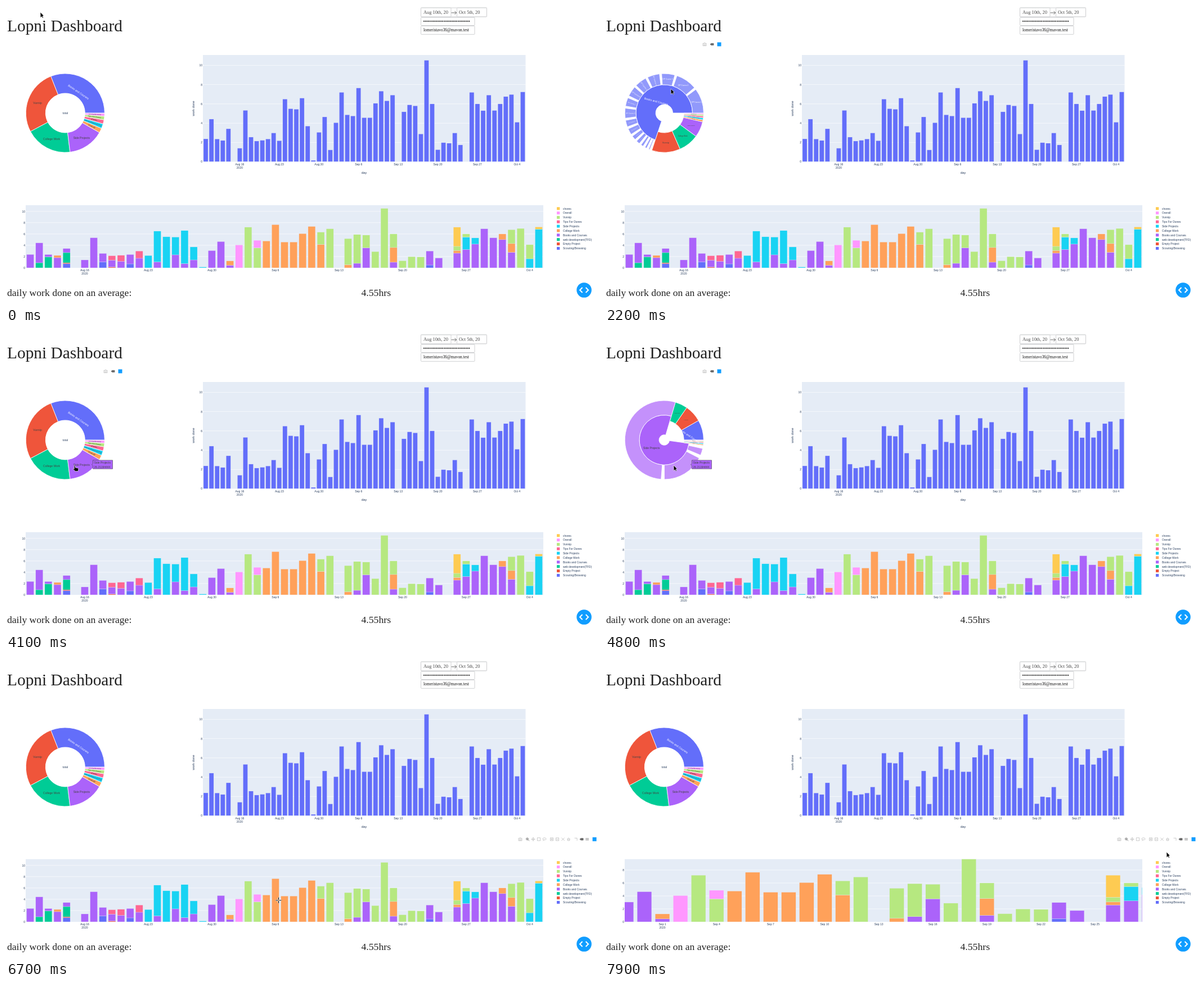
Animation, 1054 px wide and 531 px high, one loop 8 s. Source, as an HTML page:

```html
<!DOCTYPE html>
<html lang="en">
<head>
<meta charset="utf-8">
<title>Dashboard</title>
<style>
html, body { margin: 0; width: 100%; height: 100%; overflow: hidden; background: #fff; }
svg { display: block; width: 100%; height: 100%; font-family: "Liberation Sans", Arial, sans-serif; }
.serif { font-family: "Liberation Serif", "Times New Roman", serif; }
</style>
</head>
<body>
<svg id="stage" viewBox="0 0 1054 531"></svg>
<script>
const LOOP = 8000, ZOOM_AT = 7550, INK = '#2a3f5f', PANEL = '#e5ecf6';
const COLORS = { b: '#636efa', r: '#ef553b', g: '#00cc96', p: '#ab63fa', o: '#ffa15a',
  c: '#19d3f3', w: '#ff6692', l: '#b6e880', m: '#ff97ff', y: '#fecb52' };

// One entry per day from Aug 10; each part is a colour key and the height its top reaches.
const DAYS = (`p2.37|g.9 p4.42|g1.95 p2.36|p1.8 o2.2|b.75 r.9 g2.7 p3.42||p1.4|p5.33|b1.05 p2.55|
r.15 p1.35 w2.14|p1.15 w2.22|b.7 p2.36|p1.7 w2.98|c2.18|p1.05 c6.5|c5.5|p2.3 c5.45|p.75 c6.6|p1.4 c3.7|
c.14|p3.05|p4.65|p.45 o1.22|m4.05|l7.2|l3.55 m4.87|o4.75|o7.65|o4.57|o4.57|o6.06|o7.33|o4.15 l6.32|l6.92||
o.55 l5.18|p.8 l5.9|p3.55 l5.8|l2.88|l10.53|p1 o3.6 l6|l1.25|l1.98|l1.92|b.5 p2.98|p1.74||
p2.6 o3.08 l3.8 y7.2|p3.25 c5.45 l6|p4.2 c5.3|p6.92|p5.32|p5 o6|p2.75 o4.3 l6.76|l6.98|c1.6 l4.1|c6.85 y7.24`)
  .replace(/\n/g, '').split('|').map(day => day.split(' ').filter(Boolean)
    .map(part => ({ color: COLORS[part[0]], top: +part.slice(1) })));

const LEGEND = [['y', 'chores'], ['m', 'Overall'], ['l', 'Vunnip'], ['w', 'Tips For Dunes'],
  ['c', 'Side Projects'], ['o', 'College Work'], ['p', 'Books and Courses'],
  ['g', 'web development(TFD)'], ['r', 'Empty Project'], ['b', 'Scouting/Browsing']];

const text = (x, y, size, str, extra = '') =>
  `<text x="${x}" y="${y}" font-size="${size}" fill="${INK}" ${extra}>${str}</text>`;
const serif = (x, y, size, str, fill = '#222') =>
  `<text class="serif" x="${x}" y="${y}" font-size="${size}" fill="${fill}">${str}</text>`;
const rect = (x, y, w, h, fill, extra = '') =>
  `<rect x="${x}" y="${y}" width="${w}" height="${h}" fill="${fill}" ${extra}/>`;
const middle = 'text-anchor="middle"', end = 'text-anchor="end"';
const lerp = (a, b, t) => a + (b - a) * t;
const clamp = t => Math.max(0, Math.min(1, t));

const dateLabel = i => i < 22 ? `Aug ${10 + i}` : i < 52 ? `Sep ${i - 21}` : `Oct ${i - 51}`;

// c: plot box, first: x of day 0, step: px per day, unit: px per hour
function barChart(c) {
  const { left, right, top, base, first, step, unit, ticks, yMax, clip } = c;
  let out = `<clipPath id="${clip}">${rect(left, top, right - left, base - top, '#000')}</clipPath>`;
  out += rect(left, top, right - left, base - top, PANEL);
  for (let v = 0; v <= yMax; v += 2) {
    const y = base - v * unit;
    if (v) out += rect(left, y - .3, right - left, .6, '#fff');
    out += text(left - 1, y + 1.9, 5, v, end);
  }
  out += `<g clip-path="url(#${clip})" stroke="${PANEL}" stroke-width=".3">`;
  DAYS.forEach((parts, i) => {
    const x = first + (i - .4) * step;
    let from = 0;
    const shown = c.plain && parts.length ? [{ color: COLORS.b, top: parts[parts.length - 1].top }] : parts;
    for (const { color, top: to } of shown) {
      out += rect(x, base - to * unit, step * .8, (to - from) * unit, color);
      from = to;
    }
  });
  out += '</g>';
  ticks.forEach((i, n) => {
    const x = first + i * step;
    out += text(x, base + 6, 5, dateLabel(i), middle);
    if (!n) out += text(x, base + 12.3, 5, 2020, middle);
  });
  return out;
}
const series = (from, step, count) => Array.from({ length: count }, (_, n) => from + n * step);

const ICONS = {
  camera: 'M-3-1.6h1.6l.6-1h1.6l.6 1H3v4.2h-6zM0-.8a1.4 1.4 0 1 0 .01 0',
  glass: 'M-.5-2.5a2 2 0 1 0 .01 0M1 1l2 2M-1.5-.5h2M-.5-1.5v2',
  pan: 'M-3 0h6M0-3v6M-1-2l1-1 1 1M-1 2l1 1 1-1M-2-1l-1 1 1 1M2-1l1 1-1 1',
  box: 'M-2.6-2.6h5.2v5.2h-5.2z',
  lasso: 'M0-2.4c4 0 4 3.6 0 3.6s-4-3.6 0-3.6M-1.5 1l-.8 2',
  plus: 'M-2.5-2.5h5v5h-5zM-1.5 0h3M0-1.5v3',
  minus: 'M-2.5-2.5h5v5h-5zM-1.5 0h3',
  fit: 'M-2.7-2.7l5.4 5.4M2.7-2.7l-5.4 5.4',
  home: 'M-2.8 0l2.8-2.4 2.8 2.4M-1.8 0v2.4h3.6V0z',
  spike: 'M-2.5-2h4.5v4.5',
  tag: 'M-3 0l1.6-1.6H3v3.2h-4.4z',
  tags: 'M-2.6-1.8h5.2v1.3h-5.2zM-2.6.5h5.2v1.3h-5.2z'
};
const FULL = [['camera', -132], ['glass', -119, 1], ['pan', -109], ['box', -99], ['lasso', -89], ['plus', -76],
  ['minus', -66], ['fit', -56], ['home', -46], ['spike', -33], ['tag', -23, 1], ['tags', -13]];
function modebar(id, x, y, icons) {
  const marks = icons.map(([name, dx, dark]) => `<path d="${ICONS[name]}" transform="translate(${x + dx} ${y})"
    fill="${/tag/.test(name) ? '#444' : 'none'}" stroke="#444" stroke-width=".8" opacity="${dark ? .8 : .35}"/>`);
  return `<g id="${id}">${marks.join('')}${rect(x - 3.5, y - 3.5, 7, 7, '#119dff')}</g>`;
}

const field = (x, y, w, h) => rect(x, y, w, h, '#fff', 'stroke="#c4c6c8" stroke-width=".8" rx="1"');
function tooltip(id, x, y, w, fill, ink, lines) {
  return `<g id="${id}"><path d="M${x - 2} ${y}l2-2v-5.8h${w}v15.4h${-w}v-5.6z" fill="${fill}" stroke="${ink}" stroke-width=".6"/>
    ${lines.map((s, n) => `<text x="${x + 2}" y="${y - 1.3 + n * 7.3}" font-size="5" fill="${ink}">${s}</text>`).join('')}</g>`;
}

const daily = { left: 350, right: 923.5, top: 87, base: 276.5, first: 355.03, step: 10.061, unit: 17.1,
  ticks: series(6, 7, 8), yMax: 10, plain: true, clip: 'clipDaily' };
const stacked = { left: 35, right: 955, top: 353.7, base: 465, first: 43.07, step: 16.14, unit: 10.02,
  ticks: series(6, 7, 8), yMax: 10, clip: 'clipAll' };
const zoomed = { ...stacked, first: 38 - 20 * 32.04, step: 32.04, unit: 11.5,
  ticks: series(22, 3, 9), yMax: 8, clip: 'clipZoom' };

const stage = document.getElementById('stage');
stage.innerHTML = `
  ${rect(0, 0, 1054, 531, '#fff')}
  ${serif(2, 45, 29.4, 'Lopni Dashboard')}
  ${field(737.5, 3.2, 117, 15.8)}${field(737.5, 3.2, 53.5, 15.8)}${field(801.5, 3.2, 53, 15.8)}
  ${serif(742, 14, 8.35, 'Aug 10th, 20', '#484848')}${serif(805, 14, 8.35, 'Oct 5th, 20', '#484848')}
  <path d="M791.5 12h9M797.5 9l3 3-3 3" fill="none" stroke="#484848" stroke-width=".8"/>
  ${field(737.5, 20.3, 95.5, 14.2)}${field(737.5, 35.6, 95.5, 14.8)}
  ${serif(741.5, 29.5, 7.95, '•'.repeat(30), '#111')}${serif(742, 45.4, 7.35, 'lomeristavo36@mavon.test', '#111')}
  <g id="pie"></g>
  ${barChart(daily)}
  ${text(636.5, 298, 6, 'day', middle)}
  ${text(0, 0, 5.9, 'work done', middle + ' transform="translate(335 182) rotate(-90)"')}
  <g id="wide">${barChart(stacked)}</g><g id="near">${barChart(zoomed)}</g>
  ${LEGEND.map(([key, name], n) => rect(979, 357.2 + n * 7.85, 5.3, 5, COLORS[key]) +
    text(990, 361.6 + n * 7.85, 4.93, name)).join('')}
  ${modebar('barPie', 203, 68, [['camera', -26], ['tag', -13, 1]])}
  ${modebar('barDaily', 950, 68, FULL)}${modebar('barStacked', 1046, 318.3, FULL)}
  ${tooltip('tipBooks', 153.5, 147.5, 51, COLORS.b, '#fff', ['Books and Courses', '54.62833333'])}
  ${tooltip('tipSide', 154.5, 233.7, 35, COLORS.p, '#444', ['Side Projects', '26.21194444'])}
  ${serif(2, 515, 17.6, 'daily work done on an average:')}${serif(631.5, 515, 17.7, '4.55hrs')}
  <circle cx="1027.5" cy="504.5" r="13.3" fill="#119dff"/>
  <path d="M1024.5 500l-4.5 4.5 4.5 4.5M1030.5 500l4.5 4.5-4.5 4.5" fill="none" stroke="#fff" stroke-width="2"/>
  <path id="shade" fill-rule="evenodd" fill="#000" fill-opacity=".3"/>
  <path id="corners" fill="none" stroke="#444" stroke-width="1.5"/>
  <g id="cursor">
    <path id="arrow" d="M0 0L6.3 6.4 4 6.9 5.4 9.6 4 10.4 2.5 7.7.2 9.8z" fill="#000" stroke="#fff" stroke-width=".6"/>
    <path id="hand" d="M-1 0q1.2-.8 1.6.5l.5 3.4 4.8 1.2q1.1.5.9 1.8l-.8 3.6h-4.6L-2.8 7q-.6-1.2.8-1.2l1.3.8z"
      fill="#000" stroke="#fff" stroke-width=".6"/>
    <path id="cross" d="M-5 0H-1M1 0H5M0-5V-1M0 1V5" stroke="#fff" stroke-width="2.6"/>
    <path id="crossInk" d="M-5 0H-1M1 0H5M0-5V-1M0 1V5" stroke="#000" stroke-width="1.2"/>
  </g>`;
const $ = id => document.getElementById(id);
const show = (id, on) => $(id).style.display = on ? '' : 'none';

// Sunburst: angles run counter-clockwise from the right, in degrees.
const CX = 105.3, CY = 190, RING = 35, OUTER = 70;
const EDGES = [0, 111.5, 208, 277, 330.3, 337, 344, 350, 355.3, 359.4];
const SLICES = [['b', 'Books and Courses'], ['r', 'Vunnip'], ['g', 'College Work'], ['p', 'Side Projects'],
  ['o', 'Overall'], ['c', 'web development(TFD)'], ['w', 'chores'], ['l', 'Tips For Dunes'], ['m', 'Scouting/Browsing']];
const CHILDREN = { 0: [53, 45, 28, 26, 25, 22, 18, 21, 14, 13, 9, 7.5, 5, 4, 2.5], 3: [172, 56, 9] };

function polar(r, deg) {
  const a = deg * Math.PI / 180;
  return [CX + r * Math.cos(a), CY - r * Math.sin(a)];
}
function wedge(r0, r1, a0, a1, color, opacity = 1) {
  if (a1 - a0 < .01 || r1 - r0 < .05) return '';
  const paint = `fill="${color}" fill-opacity="${opacity}" stroke="#fff" stroke-width=".8"`;
  if (a1 - a0 > 359.9) return `<circle cx="${CX}" cy="${CY}" r="${r1}" ${paint}/>`;
  const big = a1 - a0 > 180 ? 1 : 0;
  return `<path d="M${polar(r1, a0)}A${r1} ${r1} 0 ${big} 0 ${polar(r1, a1)}L${polar(r0, a1)}
    A${r0} ${r0} 0 ${big} 1 ${polar(r0, a0)}z" ${paint}/>`;
}
function label(x, y, size, rot, fill, str) {
  if (size < .4) return '';
  return `<text transform="translate(${x} ${y}) rotate(${rot})" y="${size * .36}" font-size="${size}"
    fill="${fill}" text-anchor="middle">${str}</text>`;
}

// pick: zoomed slice, t: 0 whole view .. 1 fully zoomed
function drawPie(pick, t, entering) {
  const edge = n => n <= pick ? EDGES[n] * (1 - t) : 360 - (360 - EDGES[n]) * (1 - t);
  let shapes = '', labels = '';
  SLICES.forEach(([key, name], n) => {
    const a0 = edge(n), a1 = edge(n + 1), span = a1 - a0, mid = (a0 + a1) / 2;
    const r0 = n === pick ? RING * (1 - t) : RING, r1 = r0 + RING;
    shapes += wedge(r0, r1, a0, a1, COLORS[key]);
    if (span < .3) return;
    let [x, y] = polar(n === pick && t === 1 ? 0 : (r0 + r1) / 2, mid);
    let rot = 0, size = 5 * Math.min(1, span / 53);
    if (n === 0) {
      const own = pick === 0 ? t : 0;
      x += 20 * own - 6 - 14 * own ** 6;
      y += 6 * (1 - own ** 6);
      rot = 34 * (1 - own);
      size = Math.min(5, span / 6);
    } else if (n > 3) {
      rot = 360 - mid;
      size = Math.min(5, span * .65, 33 / (name.length * .53));
    }
    labels += label(x, y, size, rot, n ? '#444' : '#fff', name);
  });
  if (t > 0) {
    const parts = CHILDREN[pick], sum = parts.reduce((a, b) => a + b);
    const a0 = edge(pick), a1 = edge(pick + 1), inner = OUTER - RING * t;
    let done = 0;
    parts.forEach((part, n) => {
      const seed = lerp(EDGES[pick], EDGES[pick + 1], n / parts.length);
      const place = f => entering ? lerp(seed, 360 * f, t) : lerp(a0, a1, f);
      const c0 = place(done / sum), c1 = place((done += part) / sum);
      shapes += wedge(inner, OUTER, c0, c1, COLORS[SLICES[pick][0]], .7);
      if (!entering || pick) return;
      const mid = (c0 + c1) / 2, [x, y] = polar((inner + OUTER) / 2, mid);
      const rot = n < 3 ? 0 : mid > 90 && mid < 270 ? 180 - mid : -mid;
      labels += label(x, y, Math.min(5.6 * t, (c1 - c0) * .2), rot, '#fff', `DP Course ${n + 1}`);
    });
  }
  const root = t && entering ? '' :
    `<circle cx="${CX}" cy="${CY}" r="${RING * (1 - t)}" fill="#fff"/>` + (t < 1 ? label(CX, CY, 5, 0, INK, 'total') : '');
  $('pie').innerHTML = shapes + labels + root;
}
function pieAt(ms) {
  const run = start => clamp((ms - start) / 750);
  if (ms < 2400) return [0, run(1778), true];
  if (ms < 2800) return [0, (2400 - 1778) / 750, true]; // stalls before settling
  if (ms < 3107) return [0, 1, true];
  if (ms < 4100) return [0, 1 - run(3107), false];
  if (ms < 5200) return [3, run(4250), true];
  return [3, 1 - run(5200), false];
}

const PATH = [[0, 61, 11], [400, 61, 11], [600, 240, 60], [800, 325, 108], [1100, 118, 150], [1600, 117, 147],
  [2800, 117, 147], [3100, 113, 186], [3300, 124, 229], [3600, 128, 238], [4100, 122, 235], [4900, 122, 235],
  [5200, 118, 212], [5500, 125, 230], [5700, 180, 275], [5900, 330, 300], [6300, 470, 405], [6700, 485, 427],
  [6950, 364, 369], [7500, 827, 489], [7600, 827, 489], [7800, 991, 352], [7900, 998, 341], [8000, 998, 341]];
function cursorAt(ms) {
  const n = PATH.findIndex(p => p[0] > ms), a = PATH[n - 1], b = PATH[n];
  const t = (ms - a[0]) / (b[0] - a[0]);
  return [lerp(a[1], b[1], t), lerp(a[2], b[2], t)];
}
const within = (ms, ...spans) => spans.some(([a, b]) => ms >= a && ms < b);

function draw(ms) {
  drawPie(...pieAt(ms));
  const [x, y] = cursorAt(ms);
  $('cursor').setAttribute('transform', `translate(${x} ${y})`);
  const hand = within(ms, [1050, 1778], [2800, 3107], [3857, 4250], [5000, 5200]);
  const cross = within(ms, [6200, 7700]);
  show('hand', hand);
  show('cross', cross);
  show('crossInk', cross);
  show('arrow', !hand && !cross);

  show('barPie', within(ms, [1000, 5700]));
  show('barDaily', within(ms, [700, 1000], [5700, 5950]));
  show('barStacked', ms >= 5950);
  show('tipBooks', within(ms, [1100, 1778]));
  show('tipSide', within(ms, [3900, 5750]));
  show('wide', ms < ZOOM_AT);
  show('near', ms >= ZOOM_AT);

  const dragging = within(ms, [7000, ZOOM_AT]);
  show('shade', dragging);
  show('corners', dragging);
  if (dragging) {
    const l = 364, t = 368.5, r = x, b = Math.min(y, 465);
    $('shade').setAttribute('d', `M35 353.7H955V465H35zM${l} ${t}H${r}V${b}H${l}z`);
    $('corners').setAttribute('d', `M${l} ${t + 8}V${t}h8M${r - 8} ${t}H${r}v8M${r} ${b - 8}V${b}h-8M${l + 8} ${b}H${l}v-8`);
  }
}

const began = performance.now();
function tick() {
  draw((performance.now() - began) % LOOP);
  requestAnimationFrame(tick);
}
tick();
</script>
</body>
</html>
```
